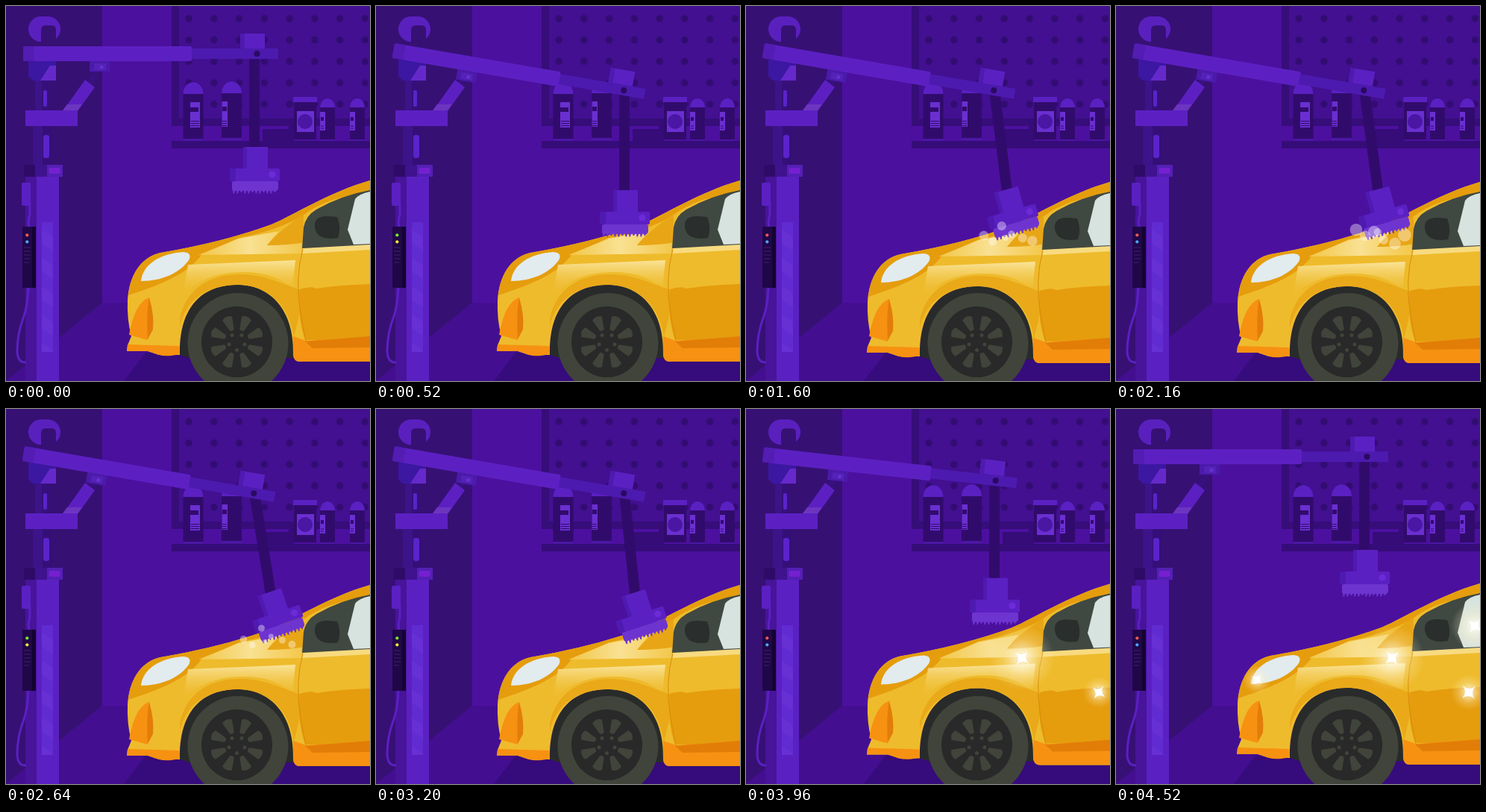
These frames come from a looping animation (488 px wide and 503 px high, 4800 ms). An HTML page:

```html
<!DOCTYPE html>
<html lang="en">
<head>
<meta charset="utf-8">
<title>Robot car wash</title>
<style>
  html, body { margin: 0; width: 100%; height: 100%; overflow: hidden; background: #4c109f; }
  svg { display: block; width: 100%; height: 100%; }
</style>
</head>
<body>
<svg viewBox="0 0 488 503" preserveAspectRatio="none">
  <defs>
    <pattern id="holes" x="228.2" y="2.6" width="33.75" height="28.7" patternUnits="userSpaceOnUse">
      <circle cx="16.9" cy="14.3" r="4.8" fill="#330c73"/>
    </pattern>
    <pattern id="stripes" x="48" y="290" width="15" height="38" patternUnits="userSpaceOnUse">
      <path d="M0 10 15 20V38L0 28Z" fill="#6730d4"/>
    </pattern>
    <radialGradient id="glow">
      <stop offset="0" stop-color="#fff" stop-opacity=".9"/>
      <stop offset=".25" stop-color="#fffbe8" stop-opacity=".62"/>
      <stop offset=".6" stop-color="#fff3c4" stop-opacity=".26"/>
      <stop offset="1" stop-color="#fff3c4" stop-opacity="0"/>
    </radialGradient>
    <linearGradient id="shine">
      <stop offset="0" stop-color="#f2c646"/>
      <stop offset=".5" stop-color="#f9e193"/>
      <stop offset="1" stop-color="#f3c84c"/>
    </linearGradient>
    <linearGradient id="sheen" x2="0" y2="1">
      <stop offset="0" stop-color="#fae49a"/>
      <stop offset="1" stop-color="#eebb2c" stop-opacity="0"/>
    </linearGradient>
    <g id="bottle">
      <path d="M0 77V15H27V77Z" fill="#310b6c"/>
      <path d="M0 16C1-5 26-5 27 16Z" fill="#5b20c2"/>
      <path d="M0 76H27V79H0Z" fill="#4b17a5"/>
    </g>
    <g id="mini">
      <path d="M0 12H20V55H0Z" fill="#310b6c"/>
      <path d="M0 12C1-4 19-4 20 12Z" fill="#5b20c2"/>
      <path d="M0 18H7V43H0Z" fill="#6a2fd0"/>
      <path d="M1 25H5V30H1ZM1 36.500H5V37.500H1ZM1 39.500H5V40.500H1Z" fill="#310b6c"/>
      <path d="M0 55H20V57H0Z" fill="#4b17a5"/>
    </g>
  </defs>

  <!-- room -->
  <path d="M0 0H488V503H0Z" fill="#4c109f"/>
  <path d="M129 398H488V503H0Z" fill="#430f90"/>
  <path d="M0 0H129V398L0 503Z" fill="#371074"/>
  <path d="M158 503 187 465H488V503Z" fill="#360b7b"/>
  <path d="M222 0H488V161H222Z" fill="#360d79"/>
  <path d="M232 0H488V151H232Z" fill="#421090"/>
  <path d="M232 0H488V145H232Z" fill="url(#holes)"/>
  <path d="M232 161H488V181H232Z" fill="#4c109f"/>
  <path d="M344 165H379V181H344ZM379 151H386V181H379ZM222 181H488V191H222Z" fill="#350c78"/>

  <use href="#bottle" x="237.500" y="102"/>
  <path d="M247 129H260V163H247Z" fill="#6a2fd0"/>
  <path d="M247 136H258V142H247ZM248 154H259V155H248ZM248 157H259V158H248ZM248 160H259V161H248Z" fill="#310b6c"/>
  <use href="#bottle" x="289" y="101"/>
  <path d="M289.500 128H297V162H289.500Z" fill="#6a2fd0"/>
  <path d="M290 135H296V141H290ZM290 154H296V155H290ZM290 157H296V158H290ZM290 160H296V161H290Z" fill="#310b6c"/>
  <path d="M386 129H416V179H386Z" fill="#310b6c"/>
  <path d="M385 122H417V129H385Z" fill="#5b20c2"/>
  <path d="M390 141H413V169H390Z" fill="#6a2fd0"/>
  <circle cx="401" cy="155" r="10" fill="#4a16a4"/>
  <use href="#mini" x="421" y="124"/>
  <use href="#mini" x="461" y="124"/>

  <!-- post -->
  <rect x="30" y="14" width="43" height="34" rx="17" fill="#5a20be"/>
  <path d="M47 60V32Q47 26 53 26H61Q67 26 67 32V60Z" fill="#371074"/>
  <path d="M30 72H67V100H36L30 94Z" fill="#3c17a2"/>
  <path d="M46 100 59 80H67V100Z" fill="#6529ca"/>
  <path d="M39 100H58V140H39Z" fill="#35107a"/>
  <path d="M39 100H48V140H39ZM36 161H49V213H36Z" fill="#3d1389"/>
  <path d="M49 161H61V213H49Z" fill="#340f78"/>
  <rect x="50" y="113" width="5" height="22" rx="2" fill="#5b23ca"/>
  <rect x="50" y="173" width="8" height="31" rx="3" fill="#5b23ca"/>
  <path id="rod" stroke="#38117f" stroke-width="8"/>
  <path d="M76 141 106 99 119 109 96 141Z" fill="#5c20c2"/>
  <path d="M76 140 82 132H102L96 140Z" fill="#6c35c0"/>
  <path d="M26 140H96V161H26Z" fill="#5c20c2"/>
  <path d="M26 229H41V503H26Z" fill="#47149a"/>
  <path d="M41 229H71V503H41Z" fill="#5b20c2"/>
  <path d="M48 290H63V464H48Z" fill="#602bd0"/>
  <path d="M48 290H63V464H48Z" fill="url(#stripes)"/>
  <path d="M24 213H39V229H24Z" fill="#2f0b68"/>
  <path d="M39 213H55V229H39Z" fill="#3f128e"/>
  <path d="M55 213H76V229H55Z" fill="#5320b4"/>
  <rect x="57.500" y="217" width="15" height="8" rx="2" fill="#7520d0"/>
  <path d="M32 264V280Q29 288 31 297M30 378Q29 403 23 419Q15 440 15 464Q16 479 27 478" fill="none" stroke="#5b20c2" stroke-width="3"/>
  <rect x="21" y="237" width="12" height="31" rx="2" fill="#5b20c2"/>
  <path d="M22 296H40V378H22Z" fill="#200748"/>
  <path d="M35 296H40V378H35Z" fill="#140332"/>
  <path d="M24 324H33M24 329H33M24 334H33M24 339H33M24 344H31" stroke="#40206e"/>
  <circle id="lampA" cx="28.300" cy="307.300" r="2.100"/>
  <circle id="lampB" cx="28.300" cy="316.300" r="2.100"/>

  <!-- car -->
  <g id="body">
    <path d="M233 468C232 404 262 374 311 374C355 374 386 406 387 458V472H246Z" fill="#292b2a"/>
    <path d="M162 463 163 455 168 443Q162 420 163 395C165 361 181 337 207 331Q290 317 356 293C387 280 432 250 488 234V477H394Q386 477 385 468C387 408 354 374 311 374C262 374 232 404 233 468L205 468 190 463Z" fill="#eebb2c"/>
    <path d="M164 388C167 358 183 336 207 331Q290 317 356 293C387 280 432 250 488 234V250Q430 256 398 281Q365 301 312 311L282 325 262 334C244 358 213 372 164 388Z" fill="#e59d0d"/>
    <path d="M258 334 312 312 366 302 350 321 396 318V332Z" fill="url(#shine)"/>
    <path d="M350 321Q361 306 399 279V317Q380 321 350 321Z" fill="#e8a616"/>
    <path d="M244 347 388 341 384 379Q355 352 300 358Q260 363 237 389Z" fill="url(#sheen)"/>
    <path d="M233 420C242 374 280 360 314 360C350 360 376 376 397 381L392 420 386 444C380 400 350 374 311 374C268 374 240 396 233 430Z" fill="#e9a918"/>
    <path d="M394 380Q410 375 416 379Q448 374 488 373V448H401Q390 416 394 380Z" fill="#e59d0d"/>
    <path d="M398 325 488 319V327L397 332Z" fill="#f8db80"/>
    <path d="M385 443 402 449 488 444V477H394Q386 477 385 468Z" fill="#f79111"/>
    <path d="M401 450 488 443V458L411 459Z" fill="#e27d08"/>
    <path d="M398 326Q387 365 395 413L402 449 411 459" fill="none" stroke="#d98b0b"/>
    <path d="M397 325 399 297Q402 281 416 273Q449 254 488 247V320Z" fill="#404842"/>
    <path d="M414 292Q416 281 432 282L444 283Q450 298 445 311Q430 314 420 308Q413 302 414 292Z" fill="#2a2e2c"/>
    <path d="M458 300 468 259Q473 252 488 249V319L466 320Z" fill="#d7e3df"/>
    <path d="M181 369C183 347 206 332 238 330Q250 331 245 341C233 358 209 369 181 369Z" fill="#e2ebee"/>
    <path d="M165 441Q173 397 192 391L190 448Z" fill="#f79111"/>
    <path d="M192 391Q199 415 197 434L190 447Q188 411 192 391Z" fill="#e27d08"/>
    <path d="M162 463 163 454 232 456 233 467Q215 471 205 468L191 463Z" fill="#f79111"/>
  </g>
  <g id="wheel" transform="translate(309.500 450.500)">
    <circle cx="1.500" cy="2" r="67.500" fill="#40443a"/>
    <circle r="47.500" fill="#292929"/>
  </g>

  <!-- arm and brush -->
  <g id="stem"><path d="M326 60H340V206H326Z" fill="#310b6c"/></g>
  <g id="head">
    <path d="M318 189H351V221H318Z" fill="#5b20c2"/>
    <path d="M318 189H323V221H318Z" fill="#4e1ab0"/>
    <path id="bristles" fill="#6e34cf"/>
    <rect x="300" y="218" width="67" height="17" rx="2" fill="#5b20c2"/>
    <path d="M302 218H308V235H302Q300 235 300 233V220Q300 218 302 218Z" fill="#4e1ab0"/>
    <circle cx="357" cy="226" r="4.500" fill="#6d2bd8"/>
  </g>
  <g id="arm">
    <path d="M112 74H139V88H112Z" fill="#4b1aa9"/>
    <path d="M118 77H134V86H118Z" fill="#5422b6"/>
    <circle cx="128" cy="82" r="2.500" fill="#6730d0"/>
    <path d="M314 37H347V57H314Z" fill="#5b20c2"/>
    <path d="M314 37H320V57H314Z" fill="#4e1ab0"/>
    <path d="M246 57H365V71H246Z" fill="#4c1aae"/>
    <rect x="23" y="54" width="226" height="20" rx="2" fill="#5c20c2"/>
    <path d="M25 54H38V74H25Q23 74 23 72V56Q23 54 25 54Z" fill="#531cb3"/>
    <circle cx="336.500" cy="64" r="4" fill="#2a0a60"/>
  </g>
  <g id="foam" fill="#fff" fill-opacity=".38"></g>
  <g id="sparkles"></g>
</svg>

<script>
const $ = id => document.getElementById(id);
const put = (id, name, value) => $(id).setAttribute(name, value);

function add(parent, tag, attrs) {
  const el = document.createElementNS('http://www.w3.org/2000/svg', tag);
  for (const k in attrs) el.setAttribute(k, attrs[k]);
  return parent.appendChild(el);
}

const ease = u => (1 - Math.cos(Math.PI * Math.min(1, Math.max(0, u)))) / 2;

// Eased value at t along [time, value] stops
function track(t, stops) {
  let v = stops[0][1];
  for (let i = 1; i < stops.length; i++) {
    const [t0, v0] = stops[i - 1], [t1, v1] = stops[i];
    if (t >= t0) v = v0 + (v1 - v0) * ease((t - t0) / (t1 - t0));
  }
  return v;
}

const ARM = [[0, 0], [520, 1], [3570, 1], [4540, 0]];
const SWING = [[560, 0], [1040, -7.2], [1220, -9.3], [1500, -6.6], [1840, -9.3],
  [2160, -7.7], [2340, -6.6], [2680, -9.3], [3200, -6], [3760, 0]];
const TILT = [[560, 0], [1040, -9.5], [1300, -16], [2160, -15], [2640, -19], [3200, -18], [3800, 0]];
const SINK = [[480, 0], [960, 2], [3400, 2], [3840, .5], [4200, 0]];
const FOAM = [[680, 0], [960, 1], [2480, 1], [2820, 0]];

// x, y, radius
const bubbles = [[320, 305, 9.5], [344, 298, 9], [332, 313, 8], [357, 309, 7],
  [385, 312, 10], [372, 314, 9], [349, 308, 6]]
  .map(([x, y, r]) => ({ x, y, r, el: add($('foam'), 'circle', {}) }));

// x, y, size, start time
const sparkles = [[370, 334, 44, 3520], [473, 380, 24, 3620], [481, 291, 32, 4040], [189, 363, 26, 4240]]
  .map(([x, y, size, start]) => {
    const el = add($('sparkles'), 'g', {});
    add(el, 'circle', { r: size, fill: 'url(#glow)' });
    const star = add(el, 'path', { d: 'M0-12Q1-1 12 0Q1 1 0 12Q-1 1-12 0Q-1-1 0-12Z', fill: '#fff' });
    return { x, y, start, el, star };
  });

// Eight openings and five bolts
for (let i = 0; i < 8; i++)
  add($('wheel'), 'path', { d: 'M-3-17-7-34Q0-39 7-34L3-17Q0-15-3-17Z', fill: '#40443a', transform: `rotate(${22.5 + i * 45})` });
for (let i = 0; i < 5; i++)
  add($('wheel'), 'circle', { cy: 11, r: 2.5, fill: '#40443a', transform: `rotate(${i * 72})` });

let teeth = 'M305 235H363Q365 235 365 238V245';
for (let i = 0; i < 12; i++) {
  const x = 363 - i * 5;
  teeth += `L${x} 248H${x - 1}L${x - 2} ${i % 3 ? 251.5 : 250}H${x - 3.5}L${x - 4} 247.5`;
}
put('bristles', 'd', teeth + 'L303 246V238Q303 235 305 235Z');

function draw(t) {
  const down = track(t, ARM), angle = 9.8 * down, rad = angle * Math.PI / 180;
  put('arm', 'transform', `rotate(${angle} 48 64)`);
  const rx = 48 + 76 * Math.cos(rad) - 18 * Math.sin(rad);
  const ry = 64 + 76 * Math.sin(rad) + 18 * Math.cos(rad);
  put('rod', 'd', `M111 106L${rx} ${ry}`);

  const swing = track(t, SWING), tilt = track(t, TILT);
  const hang = `rotate(${swing} 333 ${64 + 49 * down}) translate(0 ${58 * down})`;
  put('stem', 'transform', hang);
  put('head', 'transform', `${hang} rotate(${tilt - swing} 334 206)`);

  put('body', 'transform', `translate(0 ${track(t, SINK)})`);

  const go = t >= 400 && t < 800 || t >= 1200 && t < 1600 || t >= 2400 && t < 3600;
  put('lampA', 'fill', go ? '#7bea35' : '#f45a50');
  put('lampB', 'fill', go ? '#f6e43a' : '#4aa6f5');

  const foam = track(t, FOAM), phase = 2 * Math.PI * (t - 1040) / 1400;
  put('foam', 'opacity', Math.min(1, foam * 2));
  bubbles.forEach((b, i) => {
    b.el.setAttribute('cx', b.x - 2 * Math.sin(phase));
    b.el.setAttribute('cy', b.y + (i % 2 ? -5 : 5) * Math.sin(phase));
    b.el.setAttribute('r', b.r * foam * (.82 + .18 * Math.cos(phase)));
  });

  sparkles.forEach(s => {
    const grow = ease((t - s.start) / 440);
    s.el.setAttribute('transform', `translate(${s.x} ${s.y}) scale(${grow})`);
    s.star.setAttribute('transform', `rotate(${30 + (t - s.start) * .02})`);
  });
}

function tick() {
  const t = performance.now() % 4800;
  draw(Math.min(4520, Math.floor(t / 40) * 40));
  requestAnimationFrame(tick);
}
tick();
</script>
</body>
</html>
```
